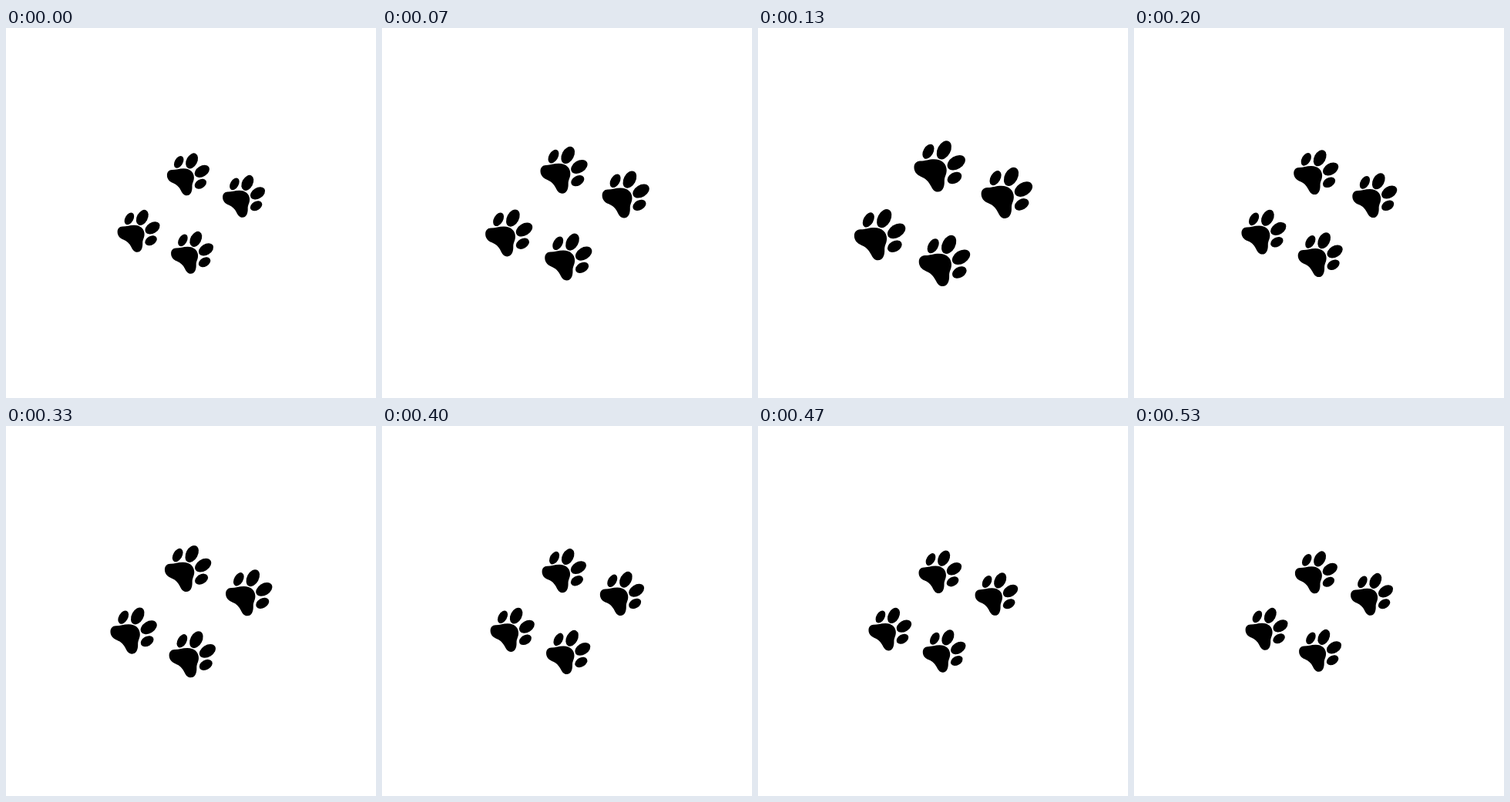
Animation of 480x480 px, one loop 1.94 s. Source, as an HTML page:

```html
<!DOCTYPE html>
<html>
<head>
<meta charset="utf-8">
<style>
  html, body { margin: 0; height: 100%; overflow: hidden; background: #fff; }
  svg { display: block; width: 100vw; height: 100vh; }
</style>
</head>
<body>
<svg viewBox="0 0 480 480">
  <defs>
    <g id="paw">
      <ellipse rx="5.3" ry="8.6" transform="translate(-12.3 -16.1) rotate(30)"/>
      <ellipse rx="7" ry="10.7" transform="translate(4.6 -17.6) rotate(28)"/>
      <ellipse rx="10.5" ry="7" transform="translate(17.8 -4.1) rotate(-32)"/>
      <ellipse rx="8.3" ry="5.7" transform="translate(15.9 12.3) rotate(-30)"/>
      <path d="M-27.6 1C-27.6 -3 -25 -6 -21 -5.9C-16 -5.8 -12 -7.8 -6 -7.8C2 -7.8 7.4 -3 7.4 4C7.4 9 4.8 11 5 16C5.2 22 3 27.3 -2 27.3C-6 27.3 -8 24 -9.5 21C-12 16 -15 13 -20 11C-25 9 -27.6 5.5 -27.6 1Z"/>
    </g>
  </defs>
  <g id="paws">
    <use href="#paw" x="236.5" y="190"/>
    <use href="#paw" x="308.7" y="218.5"/>
    <use href="#paw" x="172.2" y="263.5"/>
    <use href="#paw" x="241.7" y="291.5"/>
  </g>
</svg>
<script>
  const LOOP = 1940;
  const paws = document.getElementById('paws');
  // Double heartbeat in held steps: [start in ms, scale]
  const beat = [
    [0, 1], [70, 1.11], [130, 1.207], [200, 1.054], [270, 1.05],
    [330, 1.096], [400, 1.042], [460, 1.012], [530, 1]
  ];
  const start = performance.now();

  function draw(now) {
    const t = Math.max(0, now - start) % LOOP;
    const scale = beat.findLast(([ms]) => ms <= t)[1];
    paws.setAttribute('transform', `translate(240 240) scale(${scale}) translate(-240 -240)`);
    requestAnimationFrame(draw);
  }
  draw(start);
</script>
</body>
</html>
```
